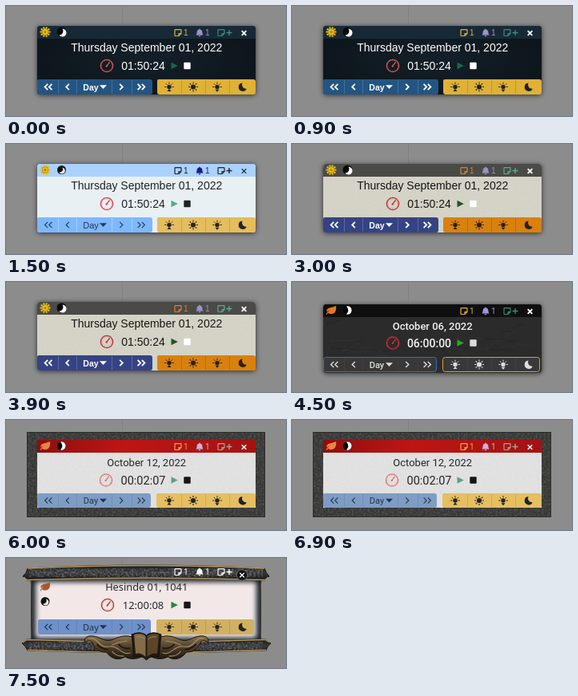
An HTML page for the animation above (8 s loop, 350 by 138 pixels).

```html
<!DOCTYPE html>
<html lang="en">
<head>
<meta charset="utf-8">
<style>
  html, body { margin: 0; width: 100%; height: 100%; overflow: hidden; background: #8c8c8c; }
  svg { display: block; width: 350px; height: 138px; }
  .panel { filter: drop-shadow(0 1px 3px #000a); }
  .soft { filter: blur(3px); }
</style>
</head>
<body>
<svg id="stage" viewBox="0 0 350 138">
  <defs>
    <filter id="stone" x="0" y="0" width="1" height="1">
      <feTurbulence type="fractalNoise" baseFrequency=".4" numOctaves="3" seed="4"/>
      <feColorMatrix values="0 0 0 0 .5  0 0 0 0 .5  0 0 0 0 .5  2.4 0 0 0 -.9"/>
      <feComposite in2="SourceGraphic" operator="in"/>
    </filter>
    <clipPath id="card"><rect x="39" y="25" width="273" height="86" rx="4"/></clipPath>
    <clipPath id="tallCard"><rect x="39" y="28" width="273" height="86" rx="4"/></clipPath>
    <clipPath id="scroll"><rect x="31" y="24" width="288" height="82"/></clipPath>
    <linearGradient id="redBar"><stop stop-color="#8e0e0e"/><stop offset=".4" stop-color="#bd1614"/><stop offset="1" stop-color="#a51111"/></linearGradient>
    <linearGradient id="bronze" x2="0" y2="1"><stop stop-color="#8a744f"/><stop offset=".5" stop-color="#4c3c28"/><stop offset="1" stop-color="#211912"/></linearGradient>
    <linearGradient id="iron" x2="0" y2="1"><stop stop-color="#1b1b1e"/><stop offset=".5" stop-color="#37383b"/><stop offset="1" stop-color="#151517"/></linearGradient>
    <radialGradient id="night"><stop stop-color="#142029"/><stop offset="1" stop-color="#0d161c"/></radialGradient>
  </defs>
</svg>
<script>
const LOOP = 8000, HOLD = 1500;
const stage = document.getElementById('stage');

// Basic shapes
const rect = (x, y, w, h, fill, extra = '') => `<rect x="${x}" y="${y}" width="${w}" height="${h}" fill="${fill}" ${extra}/>`;
const disc = (x, y, r, fill, extra = '') => `<circle cx="${x}" cy="${y}" r="${r}" fill="${fill}" ${extra}/>`;
const fill = (d, color, extra = '') => `<path d="${d}" fill="${color}" ${extra}/>`;
const line = (d, color, width = 1, extra = '') => `<path d="${d}" fill="none" stroke="${color}" stroke-width="${width}" ${extra}/>`;
const at = (x, y, art) => `<g transform="translate(${x} ${y})">${art}</g>`;
const text = (s, x, y, size, color, extra = '') => `<text x="${x}" y="${y}" font-size="${size}" fill="${color}" ${extra}>${s}</text>`;
const centered = 'text-anchor="middle"';
const noise = (x, y, w, h, opacity) => rect(x, y, w, h, '#000', `filter="url(#stone)" opacity="${opacity}"`);

function randomizer(seed) {
  return () => (seed = seed * 16807 % 2147483647) / 2147483647;
}

// Icons, each centred on its own origin
const rays = (angles, inner, outer, color, width) => angles.map(a => {
  const c = Math.cos(a * Math.PI / 180), s = Math.sin(a * Math.PI / 180);
  return line(`M${c * inner} ${s * inner}L${c * outer} ${s * outer}`, color, width);
}).join('');
const everyTurn = n => Array.from({ length: n }, (_, i) => i * 360 / n);

const badgeSun = disc(0, 0, 4, '#edc419', 'stroke="#8d6d08" stroke-width=".8"') +
  rays(everyTurn(10), 4, 6.5, '#e8bd15', 2) + disc(0, 0, 1.6, '#a67d0a');
const badgeLeaf = color => fill('M6-5.5C7 1 4 5 0 4.5C-2 4.5-3 4-4 3L-5.5 5.5L-6.5 4.8Q-5 2-2 0Q-5 1-5.5 2C-7-4 1-3 6-5.5Z', color);
const moonPhase = {
  thin: disc(0, 0, 6, '#080808') + fill('M1-4A5 5 0 1 1-3 4A5 5 0 0 0 1-4Z', '#fff'),
  half: disc(0, 0, 5.5, '#050505') + fill('M-1.5-5A5.2 5.2 0 1 1-1.5 5Q3 0-1.5-5Z', '#fff'),
  outlined: disc(0, 0, 5.5, '#111') + fill('M1-3A4 4 0 1 1-3 3A4 4 0 0 0 1-3Z', '#dfe4e6'),
};

const note = c => line('M-3.3-3.8H3.3Q4-3.8 4-3.1V1L1 4H-3.3Q-4 4-4 3.3V-3.1Q-4-3.8-3.3-3.8ZM1 4V1H4', c, 1.2);
const bell = c => fill('M0-5Q.8-5 .8-4Q3.4-3.5 3.4-.5Q3.4 1.6 4.6 3H-4.6Q-3.4 1.6-3.4-.5Q-3.4-3.5-.8-4Q-.8-5 0-5ZM-1.4 3.6H1.4Q1 5 0 5Q-1 5-1.4 3.6Z', c);
const plus = c => line('M-3.5 0H3.5M0-3.5V3.5', c, 1.4);
const cross = (c, w) => line('M-2.8-2.8L2.8 2.8M2.8-2.8L-2.8 2.8', c, w);
const clock = c => disc(0, 0, 7.6, 'none', `stroke="${c}" stroke-width="1.4"`) +
  rays(everyTurn(12), 5.5, 6.6, c, .5) + line('M-1 1.2L3.6-4.6', c, 1.4) + disc(-.3, .5, 1.1, c);

const chevron = (x, dir, c, w) => line(`M${x + 1.8 * dir}-3.6L${x - 1.8 * dir} 0L${x + 1.8 * dir} 3.6`, c, w);
const doubleChevron = (dir, c, w) => chevron(-2.6, dir, c, w) + chevron(2.6, dir, c, w);
const sun = c => disc(0, 0, 3.1, c) + rays(everyTurn(8), 4, 6, c, 1.1);
const lowSun = (c, up) => disc(0, 0, 2.7, c) + rays([180, 225, 270, 315, 0], 3.7, 5.8, c, 1) +
  fill(up ? 'M-2.6 5.6L0 2.6L2.6 5.6Z' : 'M-2.6 3.2H2.6L0 6.2Z', c);
const crescent = c => fill('M0-5A5.2 5.2 0 1 0 5.2 2.2A5 5 0 0 1 0-5Z', c);

// Widget parts
function header(t) {
  const y = t.headY, [a, b, c] = t.marks;
  return at(49, t.badgeY ?? y - 1, t.badge) + at(t.moonX ?? 69.5, t.moonY ?? y - 1, t.moon) +
    at(215, y, note(a)) + text('1', 222, y + 3.6, 10, a) +
    at(242, y, bell(b)) + text('1', 249, y + 3.6, 10, b) +
    at(269, y, note(c)) + at(279, y, plus(c)) +
    (t.close ?? at(297.5, y + .5, cross(t.closeColor, t.closeWidth)));
}

function readout(t) {
  const y = t.timeY, weight = `${centered} font-weight="${t.weight ?? 400}"`;
  return text(t.date, 175.7, t.dateY, t.dateSize, t.ink, weight) +
    at(t.clockX ?? 126, y, clock(t.red)) +
    text(t.time, 171.5, y + 5, t.timeSize, t.ink, weight) +
    fill(`M206.5 ${y - 4.3}L214.8 ${y}L206.5 ${y + 4.3}Z`, t.play) +
    rect(222.3, y - 4.2, 8.4, 8.4, t.stop, 'rx="1"');
}

function buttons(t) {
  const top = t.buttonY, h = t.buttonH, mid = top + h / 2, c = t.leftInk, w = t.chevron;
  const box = (x, width, color, border) => border
    ? rect(x + .5, top + .5, width - 1, h - 1, color, `rx="3" stroke="${border}"`)
    : fill(`M${x} ${top + 2}q0-2 2-2H${x + width - 3}q3 0 3 3V${top + h - 3}q0 3-3 3H${x + 3}q-3 0-3-3Z`, color);
  const split = (xs, color) => xs.map(x => line(`M${x + .5} ${top + 1}V${top + h - 1}`, color)).join('');
  return box(t.leftX ?? 39, t.leftW ?? 144, t.left, t.leftBorder) +
    box(t.rightX ?? 189, t.rightW ?? 123, t.right, t.rightBorder) +
    split([65, 88, 132, 157], t.leftSplit) + split([219, 249, 279], t.rightSplit) +
    at(53, mid, doubleChevron(1, c, w)) + at(77, mid, chevron(0, 1, c, w)) +
    at(144, mid, chevron(0, -1, c, w)) + at(169, mid, doubleChevron(-1, c, w)) +
    text('Day', 106, mid + 4, t.daySize ?? 11, c, `${centered} font-weight="${t.dayWeight ?? 400}"`) +
    fill(`M117 ${mid - 2.2}H126L121.5 ${mid + 2.6}Z`, c) +
    at(204, mid, lowSun(t.rightInk, true)) + at(234, mid, sun(t.rightInk)) +
    at(264, mid, lowSun(t.rightInk, false)) + at(295.5, mid, crescent(t.rightInk));
}

// Backdrops
const card = (bar, body, extra = '', y = 25, h = 86, clip = 'card') =>
  `<g class="panel"><g clip-path="url(#${clip})">${rect(39, y, 273, h, body)}${extra}${rect(39, y, 273, 16, bar)}</g></g>`;

function circuits() {
  const rnd = randomizer(77);
  return Array.from({ length: 24 }, () => {
    const x = 40 + rnd() * 260, y = 44 + rnd() * 60, run = 8 + rnd() * 22, turn = (rnd() - .5) * 18;
    return line(`M${x} ${y}h${run}l${Math.abs(turn)} ${turn}h${run / 2}`, rnd() > .5 ? '#343434' : '#242424', .8) +
      disc(x, y, 1, '#343434');
  }).join('');
}

function framedCard() {
  return rect(26, 15, 298, 107, '#363635') + noise(26, 15, 298, 107, .2) +
    rect(26.5, 15.5, 297, 106, 'none', 'stroke="#2b2b2a"') +
    rect(39, 25, 273, 85, '#e2e2e2') + noise(39, 41, 273, 69, .1) + rect(39, 25, 273, 16, 'url(#redBar)');
}

function ornateFrame() {
  const shade = rect(31, 24, 288, 82, 'none', 'class="soft" stroke="#142027" stroke-width="12"');
  return `<g clip-path="url(#scroll)">${rect(31, 24, 288, 82, '#f2e8e8')}${shade}</g>` +
    line('M31 28Q35 65 31 104M319 28Q315 65 319 104', '#4a4437', 1) +
    fill('M27 13Q98 9 176 9Q252 9 323 13Q325 19 329 23L324 28Q250 25 176 25Q100 25 26 28L21 23Q26 19 27 13Z', 'url(#iron)', 'stroke="#111"') +
    noise(29, 13, 292, 11, .4) +
    line('M27 13Q98 9.5 176 9.5Q252 9.5 323 13M22 24L26 27.5Q100 25 176 25Q250 25 324 27.5L328 24', '#b6935a', 1.3) +
    fill('M26 102Q100 105 176 105Q250 105 324 102L331 107Q326 111 325 116Q250 119 176 119Q100 119 27 116Q25 111 20 107Z', 'url(#iron)', 'stroke="#111"') +
    noise(29, 105, 292, 11, .4) +
    line('M21 106L26 102.5Q100 105 176 105Q250 105 324 102.5L330 106M27 115.5Q100 118.5 176 118.5Q250 118.5 325 115.5', '#b6935a', 1.3);
}

function book() {
  const wing = side => `<g transform="translate(175.5 109) scale(${side} 1)">` +
    fill('M14-8C26-15 36-9 44-6C54-3 60-13 72-11Q79-9 77-3Q72-7 68-4C66 3 60 10 50 9C44 18 34 20 27 15Q17 20 6 15Z', 'url(#bronze)', 'stroke="#1a140e"') +
    line('M20 10C31 14 35 0 46 2Q54 4 60-3T72-8M24-5Q34-4 43 0M28 14Q38 15 43 8', '#a68e63', 1.2) +
    line('M20 4Q29 6 35-1M48 6Q57 5 62-1', '#17110c', 1.5) + '</g>';
  return wing(1) + wing(-1) +
    fill('M157 96Q168 91 175.5 97Q183 91 194 96L191 124Q182 121 175.5 128Q169 121 160 124Z', '#241a12', 'stroke="#120d09"') +
    fill('M160 96Q170 93 174.5 98V124Q168 118 162 120Z', '#846b49') +
    fill('M191 96Q181 93 176.5 98V124Q183 118 189 120Z', '#5b4529') +
    line('M163 99Q170 98 173.5 102M188 99Q181 98 177.5 102', '#b39a70', .8);
}

const arial = '"Liberation Sans", Arial, sans-serif';
const september = {
  font: arial, date: 'Thursday September 01, 2022', time: '01:50:24', dateSize: 14, timeSize: 14,
  headY: 33.5, dateY: 57, timeY: 75, buttonY: 92, buttonH: 19,
  badge: badgeSun, moon: moonPhase.thin, closeColor: '#fff', closeWidth: 1.9,
};

const themes = [
  { ...september, back: card('#172936', 'url(#night)'), ink: '#fff', red: '#d95a55', play: '#17694a', stop: '#fff',
    marks: ['#e0b13a', '#9d91cb', '#329179'], left: '#235583', leftSplit: '#3f709d', leftInk: '#fff',
    right: '#dfb136', rightSplit: '#c3982d', rightInk: '#222', chevron: 1.8, dayWeight: 700, daySize: 10.5 },

  { ...september, back: card('#abd2ff', '#e9f0f4'), ink: '#202326', red: '#df3f3f', play: '#58a98a', stop: '#222',
    marks: ['#222', '#1c1c86', '#222'], closeColor: '#222', closeWidth: 1.2, moon: moonPhase.outlined,
    left: '#7db8ff', leftSplit: '#a3ceff', leftInk: '#26394d',
    right: '#e5bd5c', rightSplit: '#cba54d', rightInk: '#252525', chevron: 1.1 },

  { ...september, back: card('#4a4a46', '#d5d4c7', noise(39, 41, 273, 70, .12)), ink: '#151515', red: '#bd3030', play: '#24541d', stop: '#fff',
    marks: ['#d8832a', '#9a91c5', '#5bab91'], left: '#354384', leftSplit: '#5b679f', leftInk: '#fff',
    right: '#d9810f', rightSplit: '#b96b0a', rightInk: '#2b2013', chevron: 1.8, dayWeight: 700, daySize: 10.5 },

  { font: 'Roboto, sans-serif', date: 'October 06, 2022', time: '06:00:00', dateSize: 13, timeSize: 14, weight: 500,
    headY: 36.5, dateY: 60, timeY: 76.5, buttonY: 94, buttonH: 19,
    badge: badgeLeaf('#e87522'), moon: moonPhase.half, closeColor: '#fff', closeWidth: 1.9,
    back: card('#0f0f0f', '#2b2b2b', circuits(), 28, 86, 'tallCard'), ink: '#f2f2f2', red: '#d52f32', play: '#28a92c', stop: '#ddd',
    marks: ['#e2b331', '#a396d6', '#338f6f'], left: '#383838', leftBorder: '#2677c5', leftSplit: '#404040', leftInk: '#ddd',
    leftW: 142, right: '#383838', rightBorder: '#d9a528', rightX: 188, rightW: 122, rightSplit: '#404040', rightInk: '#ddd',
    chevron: 1.4, dayWeight: 500 },

  { font: 'Roboto, sans-serif', date: 'October 12, 2022', time: '00:02:07', dateSize: 13, timeSize: 14.5,
    headY: 33.5, dateY: 58, timeY: 75.5, buttonY: 92, buttonH: 18, clockX: 125,
    badge: badgeLeaf('#e88443'), moon: moonPhase.half, closeColor: '#fff', closeWidth: 1.6,
    back: framedCard(), ink: '#252525', red: '#e07873', play: '#58a481', stop: '#151515',
    marks: ['#e5ad43', '#c5b4dc', '#a9a29b'], left: '#7d9dc4', leftSplit: '#708fb5', leftInk: '#26354a',
    leftW: 142, right: '#e5bf61', rightX: 188, rightW: 124, rightSplit: '#d3ad54', rightInk: '#222', chevron: 1.1 },

  { font: '"Noto Sans", sans-serif', date: 'Hesinde 01, 1041', time: '12:00:08', dateSize: 12.8, timeSize: 13,
    headY: 17.5, dateY: 41, timeY: 59, buttonY: 77, buttonH: 19, clockX: 127,
    badge: badgeLeaf('#a9572b'), badgeY: 36, moon: moonPhase.outlined, moonX: 49, moonY: 54.5,
    close: disc(295, 21.5, 6.7, '#111', 'stroke="#777" stroke-width=".8"') + at(295, 21.5, cross('#fff', 1.3)),
    back: ornateFrame(), front: book(), ink: '#292729', red: '#c7332d', play: '#278738', stop: '#171717',
    marks: ['#fff', '#fff', '#fff'], left: '#6e91c9', leftSplit: '#6284bb', leftInk: '#20314d',
    leftX: 40, leftW: 141, right: '#d2b062', rightX: 188, rightW: 122, rightSplit: '#c09e52', rightInk: '#29231a', chevron: 1.1 },
];

stage.insertAdjacentHTML('beforeend', rect(0, 0, 350, 138, '#8c8c8c') + line('M145.5 0V25', '#828282') +
  themes.map(t => `<g class="theme" style='font-family:${t.font}'>${t.back}${header(t)}${readout(t)}${buttons(t)}${t.front ?? ''}</g>`).join(''));

const scenes = [...stage.querySelectorAll('.theme')];
function draw() {
  const current = Math.floor(performance.now() % LOOP / HOLD);
  scenes.forEach((scene, i) => { scene.style.display = i === current ? '' : 'none'; });
  requestAnimationFrame(draw);
}
draw();
</script>
</body>
</html>
```
